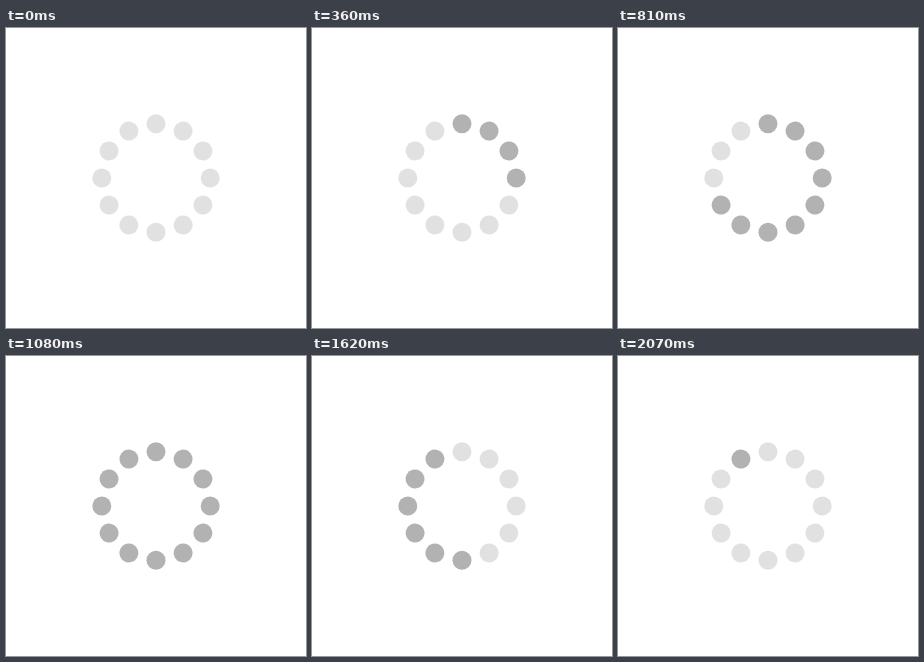
An HTML page without scripts for the animation above (2.16 s loop, 300x300 px).

```html
<!DOCTYPE html>
<html lang="en">
<head>
<meta charset="utf-8">
<title>Loading ring</title>
<style>
  html, body { margin: 0; width: 100%; height: 100%; overflow: hidden; background: #fff; }
  svg { display: block; width: 100vw; height: 100vh; }
  circle {
    fill: #e1e1e1;
    transform: rotate(calc(var(--i) * 30deg));
    animation: fill 2160ms step-end calc((var(--i) + 1) * 90ms - 2160ms) infinite;
  }
  /* Dark for half the loop, light for the other half */
  @keyframes fill {
    0% { fill: #b2b2b2; }
    50%, 100% { fill: #e1e1e1; }
  }
</style>
</head>
<body>
<svg viewBox="-150 -150 300 300">
  <defs></defs>
  <circle cy="-54.2" r="9.5" style="--i:0"/>
  <circle cy="-54.2" r="9.5" style="--i:1"/>
  <circle cy="-54.2" r="9.5" style="--i:2"/>
  <circle cy="-54.2" r="9.5" style="--i:3"/>
  <circle cy="-54.2" r="9.5" style="--i:4"/>
  <circle cy="-54.2" r="9.5" style="--i:5"/>
  <circle cy="-54.2" r="9.5" style="--i:6"/>
  <circle cy="-54.2" r="9.5" style="--i:7"/>
  <circle cy="-54.2" r="9.5" style="--i:8"/>
  <circle cy="-54.2" r="9.5" style="--i:9"/>
  <circle cy="-54.2" r="9.5" style="--i:10"/>
  <circle cy="-54.2" r="9.5" style="--i:11"/>
</svg>
</body>
</html>
```
